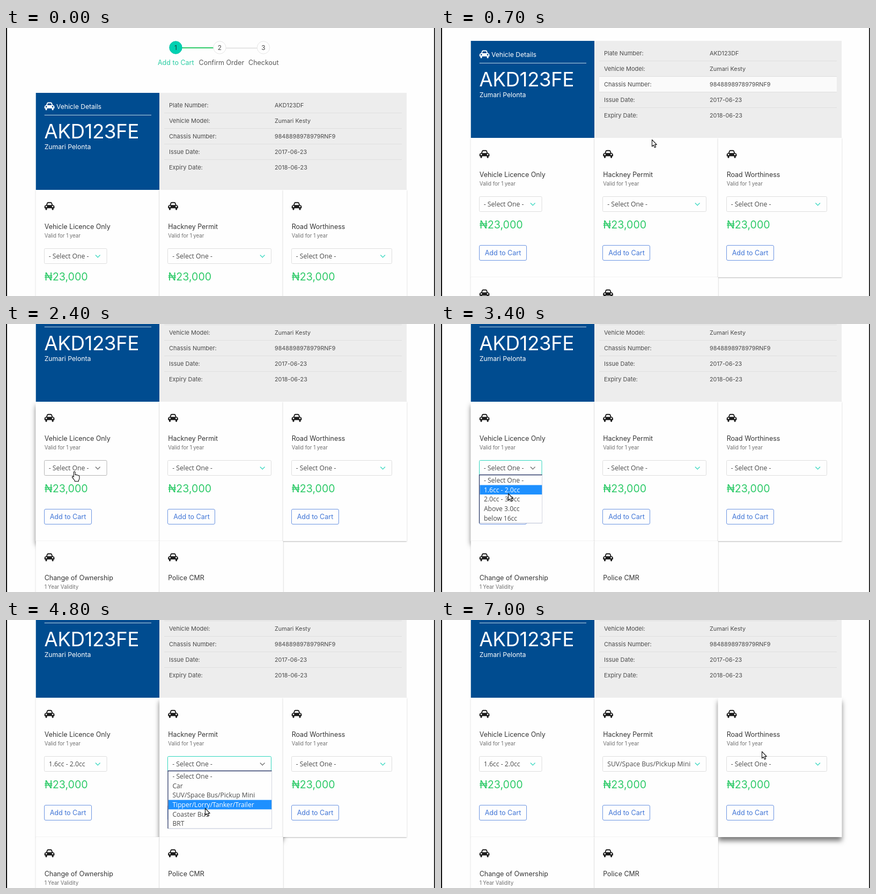
Write an HTML page that moves like this. It is 800 px wide and 500 px high and loops after 7200 ms.

```html
<!DOCTYPE html>
<html lang="en">
<head>
<meta charset="utf-8">
<title>Vehicle renewal</title>
<style>
  html, body { margin: 0; width: 100%; height: 100%; overflow: hidden; background: #fefefe; }
  svg { display: block; width: 800px; height: 500px; }
  text { font-family: Inter, Roboto, sans-serif; white-space: pre; }
  .option { font-family: "Open Sans", "Noto Sans", sans-serif; }
</style>
</head>
<body>
<svg id="stage" viewBox="0 0 800 500">
  <defs>
    <filter id="flat" x="-10%" y="-10%" width="120%" height="120%">
      <feDropShadow dx="0" dy="0.8" stdDeviation="0.9" flood-opacity="0.32"/>
    </filter>
    <filter id="raised" x="-15%" y="-15%" width="130%" height="130%">
      <feDropShadow dx="0" dy="7" stdDeviation="5" flood-opacity="0.52"/>
    </filter>
    <path id="car" fill-rule="evenodd" d="M3.2 5.6 4.6 1.6Q5.1 0 6.8 0H11.9Q13.6 0 14.1 1.6L15.5 5.6H16Q18.7 6 18.7 8.4V11.5H17V13.2Q17 15 15.4 15T13.8 13.2V11.5H4.9V13.2Q4.9 15 3.3 15T1.7 13.2V11.5H0V8.4Q0 6 2.7 5.6ZM5.2 5.6H13.5L12.6 2.6Q12.4 2 11.8 2H6.9Q6.3 2 6.1 2.6ZM2 8.4a1.4 1.4 0 1 0 2.8 0a1.4 1.4 0 1 0-2.8 0ZM13.9 8.4a1.4 1.4 0 1 0 2.8 0a1.4 1.4 0 1 0-2.8 0Z"/>
  </defs>
</svg>
<script>
const LOOP = 7200, STEP = 100, SCROLL_END = 157;
const CARD = { x: 55.7, y: 302, w: 230.5, h: 260 };
const ROW_H = 29, ROW_TOP = 129.5, OPTION_H = 17.6;
const TEAL = '#2fd6bd', INK = '#4a4a4a', DARK = '#363636', BLUE = '#3f74d6';

const stage = document.getElementById('stage');

function add(parent, tag, attrs = {}, content) {
  const node = document.createElementNS('http://www.w3.org/2000/svg', tag);
  set(node, attrs);
  if (content !== undefined) node.textContent = content;
  parent.appendChild(node);
  return node;
}
function set(node, attrs) {
  for (const key in attrs) node.setAttribute(key, attrs[key]);
}
const show = (node, on) => set(node, { visibility: on ? 'visible' : 'hidden' });
const rect = (p, x, y, width, height, attrs) => add(p, 'rect', { x, y, width, height, ...attrs });
const label = (p, x, y, size, fill, text, attrs) =>
  add(p, 'text', { x, y, 'font-size': size, fill, ...attrs }, text);
const line = (p, x1, y1, x2, y2, stroke, width = 1) =>
  add(p, 'line', { x1, y1, x2, y2, stroke, 'stroke-width': width });
const icon = (p, x, y, fill) =>
  add(p, 'use', { href: '#car', transform: `translate(${x} ${y})`, fill });

const page = add(stage, 'g');

function drawSteps() {
  line(page, 328, 37, 387, 37, '#2fcb6a', 2);
  line(page, 410, 37.5, 469, 37.5, '#dcdcdc', 1.5);
  const steps = [[316.5, 'Add to Cart', 283], [398.5, 'Confirm Order', 359.5], [480, 'Checkout', 452]];
  steps.forEach(([cx, name, x], i) => {
    add(page, 'circle', {
      cx, cy: 36.5, r: 11.7, fill: i ? '#fefefe' : '#00d1b2', stroke: i ? '#e6e6e6' : '#00c3a6'
    });
    label(page, cx, 41, 12, i ? INK : '#1d3c38', i + 1, { 'text-anchor': 'middle' });
    label(page, x, 69, 12.5, i ? '#5a5a5a' : '#2ccda4', name);
  });
}

function drawCard(i, title, note, selectWidth) {
  const x = CARD.x + (i % 3) * CARD.w, y = CARD.y + Math.floor(i / 3) * CARD.h;
  const g = add(page, 'g'), left = x + 16;
  const box = rect(g, x, y, CARD.w, CARD.h, { fill: '#fefefe' });
  icon(g, left, y + 22.7, '#1c1c1c');
  label(g, left, y + 73, 12.45, DARK, title);
  label(g, left, y + 89, 9.7, '#707070', note);
  const card = { x, y, left, box };
  if (!selectWidth) return card;

  const edge = Math.round(left) - 0.5;
  card.width = selectWidth;
  card.select = rect(g, edge, y + 109.5, selectWidth, 28, { rx: 2, fill: '#fefefe' });
  card.value = label(g, left + 8, y + 128, 12.2, INK, '', { class: 'option' });
  const tip = left + selectWidth - 17;
  card.chevron = add(g, 'path', {
    d: `M${tip - 4.3} ${y + 121.5}l4.3 4.4l4.3 -4.4`, fill: 'none', 'stroke-width': 1.2
  });
  label(g, left, y + 168.6, 19.6, '#2dca68', '₦23,000');
  rect(g, edge, y + 200.5, 88, 28, { rx: 2.5, fill: '#fefefe', stroke: '#6c95e2' });
  label(g, left + 10, y + 219.2, 12.5, BLUE, 'Add to Cart');
  return card;
}

function drawHeader() {
  const split = 286, right = CARD.x + 3 * CARD.w;
  rect(page, CARD.x, 121, split - CARD.x, 181, { fill: '#004c90' });
  icon(page, 71.7, 138.5, '#fff');
  label(page, 94, 151.4, 12.1, '#fff', 'Vehicle Details');
  line(page, 71.7, 162.5, 271, 162.5, '#c3d4e4');
  label(page, 71.3, 206, 36.8, '#fff', 'AKD123FE', { 'letter-spacing': -0.5 });
  label(page, 71.7, 225.5, 12.2, '#fff', 'Zumari Pelonta');
  rect(page, split, 121, right - split, 181, { fill: '#ededed' });
  const details = [
    ['Plate Number:', 'AKD123DF'],
    ['Vehicle Model:', 'Zumari Kesty'],
    ['Chassis Number:', '9848898978979RNF9'],
    ['Issue Date:', '2017-06-23'],
    ['Expiry Date:', '2018-06-23']
  ];
  const hover = rect(page, 295, 0, 443, ROW_H, { fill: '#fafafa' });
  details.forEach(([name, value], i) => {
    const y = ROW_TOP + i * ROW_H;
    if (i) line(page, 295, y, 738, y, '#dfdfdf');
    label(page, 304, y + 18.3, 11, INK, name);
    label(page, 501, y + 18.3, 10.8, INK, value);
  });
  return hover;
}

// Native option list, placed in screen coordinates below a settled card.
function drawList(card, options) {
  const g = add(stage, 'g'), x = card.left - 0.2, y = card.y - SCROLL_END + 137.5;
  const w = card.width + 0.6, h = options.length * OPTION_H + 1;
  rect(g, x, y - 1, w, h + 1, { fill: '#fefefe' });
  const mark = rect(g, x + 1, 0, w - 1, OPTION_H, { fill: '#1e90ff' });
  const rows = options.map((text, i) =>
    label(g, card.left + 8.2, y + 13.7 + i * OPTION_H, 12.1, INK, text, { class: 'option' }));
  line(g, x + w, y, x + w, y + h, '#c6cad6', 0.8);
  line(g, x, y + h, x + w, y + h, '#a9b2cc', 0.8);
  add(g, 'path', { d: `M${x} ${y + h}V${y - 1}H${x + w}`, fill: 'none', stroke: '#2c3a68', 'stroke-width': 1.3 });
  return { g, mark, rows, top: y + 0.4 };
}

drawSteps();
const cards = [
  drawCard(0, 'Vehicle Licence Only', 'Valid for 1 year', 116.5),
  drawCard(1, 'Hackney Permit', 'Valid for 1 year', 193),
  drawCard(2, 'Road Worthiness', 'Valid for 1 year', 187),
  drawCard(3, 'Change of Ownership', '1 Year Validity'),
  drawCard(4, 'Police CMR', '')
];
const rowHover = drawHeader();

const PROMPT = '- Select One -';
const menus = [
  { card: 0, open: 2700, close: 3600, blur: 4400, pick: '1.6cc - 2.0cc',
    options: [PROMPT, '1.6cc - 2.0cc', '2.0cc - 3.0cc', 'Above 3.0cc', 'below 16cc'] },
  { card: 1, open: 4400, close: 5200, blur: 6300, pick: 'SUV/Space Bus/Pickup Mini',
    options: [PROMPT, 'Car', 'SUV/Space Bus/Pickup Mini', 'Tipper/Lorry/Tanker/Trailer', 'Coaster Bus', 'BRT'] }
];
menus.forEach(m => { m.list = drawList(cards[m.card], m.options); });

rect(stage, 0, 0, 2, 500, { fill: '#111' });
rect(stage, 798.3, 0, 1.7, 500, { fill: '#111' });

const outline = { fill: '#fff', stroke: '#111', 'stroke-width': 1.1, 'stroke-linejoin': 'round' };
const arrow = add(stage, 'path', { d: 'M.5 .5V13L3.4 10.4L5.4 15L7.6 14L5.6 9.6H9.3Z', ...outline });
const hand = add(stage, 'path', {
  d: 'M.2 1.2Q1.7 -.6 3 1.2V6.6Q5 5.4 5.9 7Q7.8 6.2 8.6 7.8Q10.8 7.2 10.9 9.5V13Q10.6 15.3 9.4 16.6V18.5H2.2V17Q-.5 14 -2.6 10.6Q-2.6 8.6 -.6 9.4L.2 10.4Z', ...outline
});

const cursorPath = [
  [100, 420, 520], [350, 393, 208], [1500, 393, 208], [2100, 126, 275], [2900, 126, 275],
  [3200, 125, 316], [3600, 125, 316], [4200, 372, 272], [4400, 372, 272], [4700, 371, 351],
  [4850, 371, 351], [5100, 370, 330], [5250, 370, 330], [5700, 184, 347], [6000, 184, 347],
  [6350, 174, 338], [6650, 200, 330], [6950, 598, 245]
];
const scrollPath = [[300, 0], [700, 97], [850, 97], [1200, SCROLL_END]];

function along(path, t) {
  const next = path.findIndex(p => p[0] > t);
  if (next === 0) return path[0].slice(1);
  if (next < 0) return path[path.length - 1].slice(1);
  const a = path[next - 1], b = path[next];
  const u = (t - a[0]) / (b[0] - a[0]), ease = u * u * (3 - 2 * u);
  return a.slice(1).map((v, i) => v + (b[i + 1] - v) * ease);
}

function render(t) {
  const [scroll] = along(scrollPath, t), [x, y] = along(cursorPath, t);
  const pageY = y + scroll;
  const openMenu = menus.find(m => t >= m.open && t < m.close);
  set(page, { transform: `translate(0 ${-scroll})` });

  // Hover is not refreshed while the page scrolls under a resting pointer.
  const row = Math.floor((y - ROW_TOP) / ROW_H);
  show(rowHover, t > 100 && t < 900 && row >= 0 && row < 5);
  set(rowHover, { y: ROW_TOP + row * ROW_H });

  let pointing = false;
  cards.forEach((card, i) => {
    const over = t >= 1200 && x >= card.x && x < card.x + CARD.w && pageY >= card.y && pageY < card.y + CARD.h;
    set(card.box, { filter: over ? 'url(#raised)' : 'url(#flat)' });
    if (!card.select) return;

    const menu = menus.find(m => m.card === i);
    const open = Boolean(menu) && menu === openMenu;
    const focused = Boolean(menu) && t >= menu.open && t < menu.blur;
    const dx = x - card.left, dy = pageY - card.y;
    const onSelect = over && !openMenu && dx >= 0 && dx <= card.width && dy >= 109 && dy <= 138;
    const onButton = over && !openMenu && dx >= 0 && dx <= 88 && dy >= 200 && dy <= 229;
    pointing = pointing || onSelect || onButton;
    set(card.select, { stroke: focused ? TEAL : onSelect ? '#b5b5b5' : '#dedede' });
    set(card.chevron, { stroke: open || onSelect ? '#666' : TEAL });
    card.value.textContent = menu && t >= menu.close ? menu.pick : PROMPT;
  });

  menus.forEach(m => {
    const { g, mark, rows, top } = m.list;
    const active = Math.max(0, Math.min(rows.length - 1, Math.floor((y - top) / OPTION_H)));
    set(g, { display: m === openMenu ? 'inline' : 'none' });
    set(mark, { y: top + active * OPTION_H });
    rows.forEach((node, i) => set(node, { fill: i === active ? '#fff' : INK }));
  });

  show(arrow, t > 100 && !pointing);
  show(hand, pointing);
  const at = { transform: `translate(${x} ${y})` };
  set(arrow, at);
  set(hand, at);
}

const start = performance.now();
function tick() {
  const t = (performance.now() - start) % LOOP;
  render(Math.floor(t / STEP) * STEP);
  requestAnimationFrame(tick);
}
tick();
</script>
</body>
</html>
```
